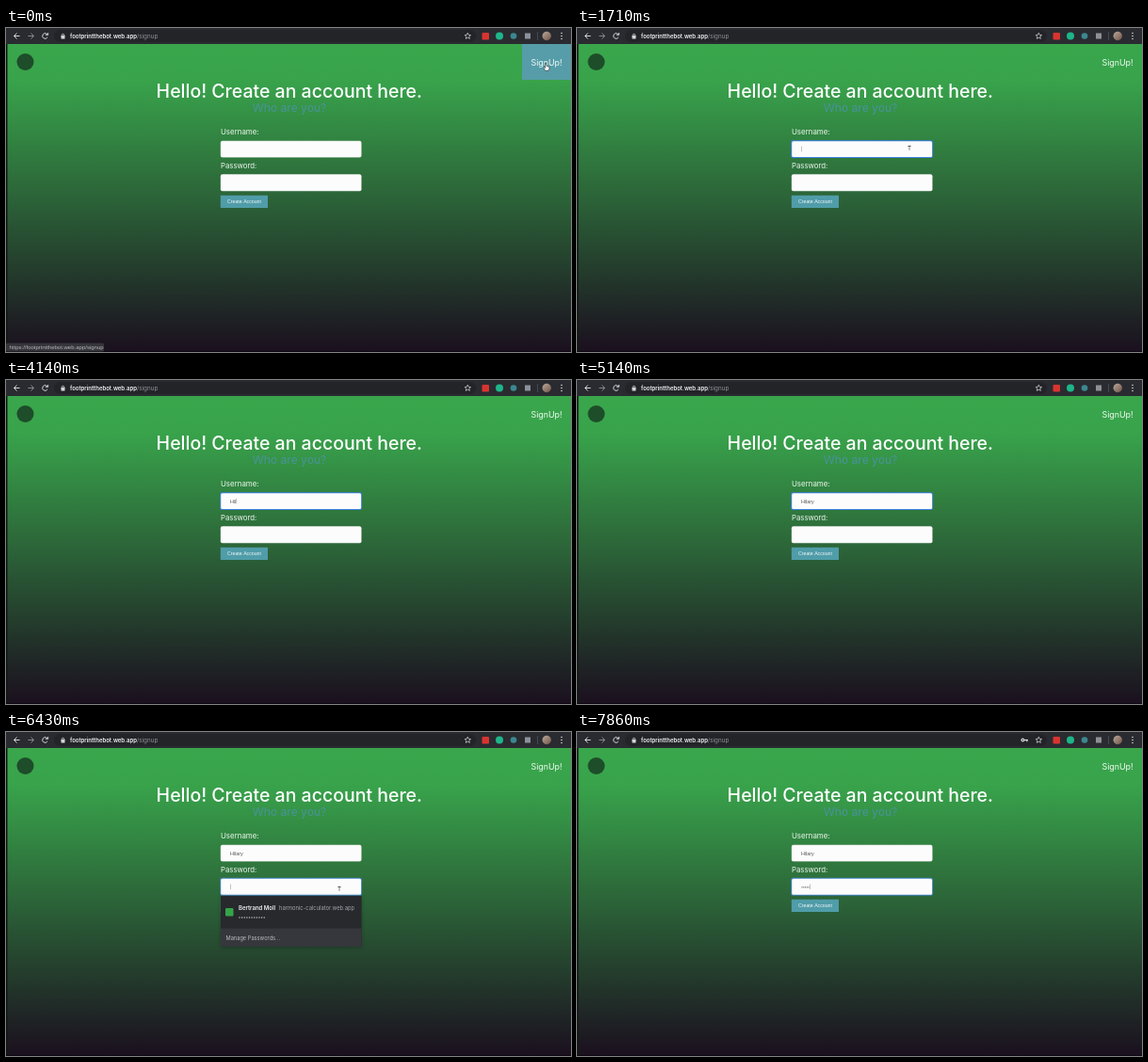
Write an HTML page with a canvas that moves like this. It is 600 px wide and 344 px high and loops after 8 s.

```html
<!DOCTYPE html>
<html lang="en">
<head>
<meta charset="utf-8">
<title>Sign up</title>
<style>
  html, body { margin: 0; width: 100%; height: 100%; overflow: hidden; background: #1b101f; }
  canvas { display: block; width: 600px; height: 344px; }
</style>
</head>
<body>
<canvas id="stage"></canvas>
<script>
const W = 600, H = 344, LOOP = 8000;
const canvas = document.getElementById('stage');
const ratio = window.devicePixelRatio || 1;
canvas.width = W * ratio;
canvas.height = H * ratio;
const ctx = canvas.getContext('2d');
ctx.scale(ratio, ratio);

const UI = 'Inter, sans-serif';
const FORM = '"Liberation Sans", sans-serif';
const TEAL = '#509ca9';

const USER = 'Hilary';
const USER_KEYS = [3710, 3860, 4000, 4280, 4430, 4570];
const PASS_KEYS = [7140, 7290, 7430, 7570, 7710];
const FOCUS_USER = 1430, FOCUS_PASS = 5430;
const USER_MENU = [2430, USER_KEYS[0]];
const PASS_MENU = [5860, PASS_KEYS[0]];

// Pointer legs: start, end, from, to
const MOVES = [
  [280, 1290, [574, 41], [353, 127.5]],
  [5200, 5430, [353, 127.5], [354, 166.5]]
];

const within = (t, [a, b]) => t >= a && t < b;
const typed = (keys, t) => keys.filter(k => t >= k).length;
const ease = p => p * p * (3 - 2 * p);

function rect(x, y, w, h, color, r = 0) {
  ctx.fillStyle = color;
  ctx.beginPath();
  ctx.roundRect(x, y, w, h, r);
  ctx.fill();
}

function disc(x, y, r, color) {
  ctx.fillStyle = color;
  ctx.beginPath();
  ctx.arc(x, y, r, 0, Math.PI * 2);
  ctx.fill();
}

function path(points, color, width, fill) {
  ctx.beginPath();
  points.forEach(([x, y]) => ctx.lineTo(x, y));
  if (fill) {
    ctx.closePath();
    ctx.fillStyle = fill;
    ctx.fill();
  }
  ctx.strokeStyle = color;
  ctx.lineWidth = width;
  ctx.stroke();
}

// Returns the x position where the text ends
function text(str, x, y, size, color, { font = UI, weight = 400, align = 'left' } = {}) {
  ctx.font = `${weight} ${size}px ${font}`;
  ctx.textAlign = align;
  ctx.fillStyle = color;
  ctx.fillText(str, x, y);
  return x + ctx.measureText(str).width;
}

function pageBackground() {
  const g = ctx.createLinearGradient(0, 17, 0, 343);
  g.addColorStop(0, '#39a64c');
  g.addColorStop(0.12, '#38a34b');
  g.addColorStop(1, '#1b101f');
  ctx.fillStyle = g;
  ctx.fillRect(0, 0, W, H);
  rect(0, 17, 1.5, H, '#101713');
  rect(0, 343, W, 1, '#0d0a10');
}

function arrow(x, dir, color) {
  path([[x - 3 * dir, 8.5], [x + 3 * dir, 8.5]], color, 1);
  path([[x, 5.5], [x + 3 * dir, 8.5], [x, 11.5]], color, 1);
}

function star(x, y) {
  const points = Array.from({ length: 11 }, (_, i) => {
    const a = i * Math.PI / 5 - Math.PI / 2, r = i % 2 ? 1.6 : 3.4;
    return [x + r * Math.cos(a), y + r * Math.sin(a)];
  });
  path(points, '#c9cbce', 0.8);
}

function toolbar(t) {
  const ink = '#d4d6d9';
  rect(0, 0, W, 17, '#292b30');
  rect(51, 2, 448, 13, '#222428', 6.5);
  arrow(11.5, -1, ink);
  arrow(26.5, 1, '#85888d');
  ctx.strokeStyle = ink;
  ctx.lineWidth = 1;
  ctx.beginPath();
  ctx.arc(41.5, 8.5, 2.8, 0.5, 5.5);
  ctx.stroke();
  path([[44.7, 5], [44.7, 7.6], [42.2, 7.6]], ink, 0.5, ink);

  rect(58.5, 7.8, 4, 3.6, ink, 0.5);
  ctx.strokeStyle = ink;
  ctx.lineWidth = 0.8;
  ctx.beginPath();
  ctx.arc(60.5, 7.6, 1.3, Math.PI, 0);
  ctx.stroke();
  const end = text('footprintthebot.web.app', 68, 10.7, 6, '#f0f1f2', { weight: 600 });
  text('/signup', end, 10.7, 6.3, '#8f9297');

  if (t >= PASS_KEYS[0]) {
    disc(473.4, 8.5, 1.9, ink);
    disc(473.4, 8.5, 0.7, '#222428');
    rect(475, 7.9, 4, 1.3, ink);
    rect(477.2, 8.5, 1.1, 1.8, ink);
  }
  star(490.3, 8.6);
  rect(505.5, 5, 7.5, 7.5, '#d8342f', 1);
  disc(524, 8.5, 4, '#1fb58a');
  disc(539, 8.5, 3.3, '#3c8790');
  rect(551, 5.5, 6, 6, '#8d9197');
  rect(564, 4, 0.7, 9, '#54575c');
  const g = ctx.createLinearGradient(570, 4, 578, 13);
  g.addColorStop(0, '#b7a79a');
  g.addColorStop(1, '#76584b');
  disc(574.2, 8.5, 4.7, g);
  [5.5, 8.5, 11.5].forEach(y => disc(590, y, 0.8, ink));
}

function field(y, h, focused, glow) {
  if (focused) rect(227.2, y - 0.8, 150.8, h + 1.6, glow, 2);
  else rect(227.8, y - 0.2, 149.7, h + 0.4, '#d3ddd5', 2);
  rect(228.2, y + 0.2, 148.9, h - 0.4, '#fcfcfc', 1.5);
}

function caret(x, y, t, since) {
  if ((t - since) % 1000 < 500) rect(x, y - 2.8, 0.6, 5.6, '#999');
}

function form(t) {
  const onUser = t >= FOCUS_USER && t < FOCUS_PASS;
  const onPass = t >= FOCUS_PASS;
  text('Hello! Create an account here.', 300.8, 73.7, 19.5, '#fff', { weight: 500, align: 'center' });
  text('Who are you?', 301, 88.7, 12.1, '#4a929b', { align: 'center' });
  text('Username:', 228, 113, 7.9, '#eef6ef');
  text('Password:', 228, 149, 7.8, '#eef6ef');
  field(120, 17.2, onUser, '#3b7fe0');
  field(155.5, 17.5, onPass, 'rgba(70,135,225,.8)');

  rect(227.8, 177.7, 50.2, 13.4, TEAL);
  text('Create Account', 253, 186.3, 5.2, '#f4fafb', { font: FORM, align: 'center' });

  const letters = typed(USER_KEYS, t);
  const end = text(USER.slice(0, letters), 238, 130.5, 5.4, '#555', { font: FORM });
  if (onUser) caret(end + 0.2, 128.5, t, letters ? USER_KEYS[letters - 1] : FOCUS_USER);

  const dots = typed(PASS_KEYS, t);
  for (let i = 0; i < dots; i++) disc(239 + i * 1.75, 164.8, 0.65, '#555');
  if (onPass) caret(238 + dots * 1.8, 164.3, t, dots ? PASS_KEYS[dots - 1] : FOCUS_PASS);
}

function passwordMenu(y) {
  ctx.save();
  ctx.shadowColor = 'rgba(0,0,0,.25)';
  ctx.shadowBlur = 4 * ratio;
  ctx.shadowOffsetY = ratio;
  rect(228, y, 149.6, 54, '#27292d', 1);
  ctx.restore();
  rect(228, y + 34.5, 149.6, 19.5, '#36373c');
  rect(233, y + 13, 8.5, 8.5, '#35a548', 1);
  text('Bertrand Moll', 247, y + 14.8, 6, '#f0f0f1', { weight: 600 });
  text('harmonic-calculator.web.app', 290, y + 14.8, 5.8, '#a2a4a8');
  for (let i = 0; i < 11; i++) disc(248 + i * 2.62, y + 23, 0.75, '#c4c5c8');
  text('Manage Passwords...', 233.5, y + 47, 5.7, '#b9bbbe');
}

function pointerAt(t) {
  let pos = MOVES[0][2];
  for (const [a, b, from, to] of MOVES) {
    if (t < a) break;
    const p = ease(Math.min(1, (t - a) / (b - a)));
    pos = from.map((v, i) => v + (to[i] - v) * p);
  }
  return pos;
}

function hand(x, y) {
  path([[-1.5, -3.5], [-0.3, -3.5], [0, -0.7], [2.8, 0], [3, 2.2], [2, 4.3],
    [-1.3, 4.3], [-3.2, 1.3], [-2.6, 0.6], [-1.4, 1.5]].map(([a, b]) => [x + a, y + b]),
    '#20282a', 0.6, '#fff');
}

function arrowPointer(x, y) {
  path([[0, 0], [0, 7.4], [1.8, 5.8], [3, 8.3], [4.1, 7.8], [3, 5.3], [5.2, 5.2], [0, 0]]
    .map(([a, b]) => [x + a, y + b]), '#e8e8e8', 0.6, '#111');
}

function beam(x, y) {
  rect(x - 0.4, y - 2.4, 0.8, 4.6, '#666');
  rect(x - 1.6, y - 2.6, 3.2, 1, '#555');
}

function draw(t) {
  const [x, y] = pointerAt(t);
  const hover = x >= 548 && y <= 55;
  const overField = x > 228 && x < 378 && ((y > 120 && y < 137) || (y > 155 && y < 173));
  const hidden = within(t, [USER_KEYS[0], MOVES[1][0]]) || t >= PASS_KEYS[0];

  pageBackground();
  disc(20.5, 36, 9, '#1d4d29');
  if (hover) rect(548, 17, 52, 38, '#569da9');
  text('SignUp!', 574, 40, 8.9, '#f3faf4', { align: 'center' });
  form(t);
  toolbar(t);
  if (within(t, USER_MENU)) passwordMenu(138);
  if (within(t, PASS_MENU)) passwordMenu(174);
  if (t < 860) {
    rect(0, 334.5, 104, 9, '#35353a', 1.5);
    text('https://footprintthebot.web.app/signup', 3.5, 341.2, 6, '#b5b6ba', { font: FORM });
  }
  if (hidden) return;
  if (hover) hand(x, y);
  else if (overField) beam(x, y);
  else arrowPointer(x, y);
}

const start = performance.now();
function tick() {
  draw((performance.now() - start) % LOOP);
  requestAnimationFrame(tick);
}
tick();
</script>
</body>
</html>
```
